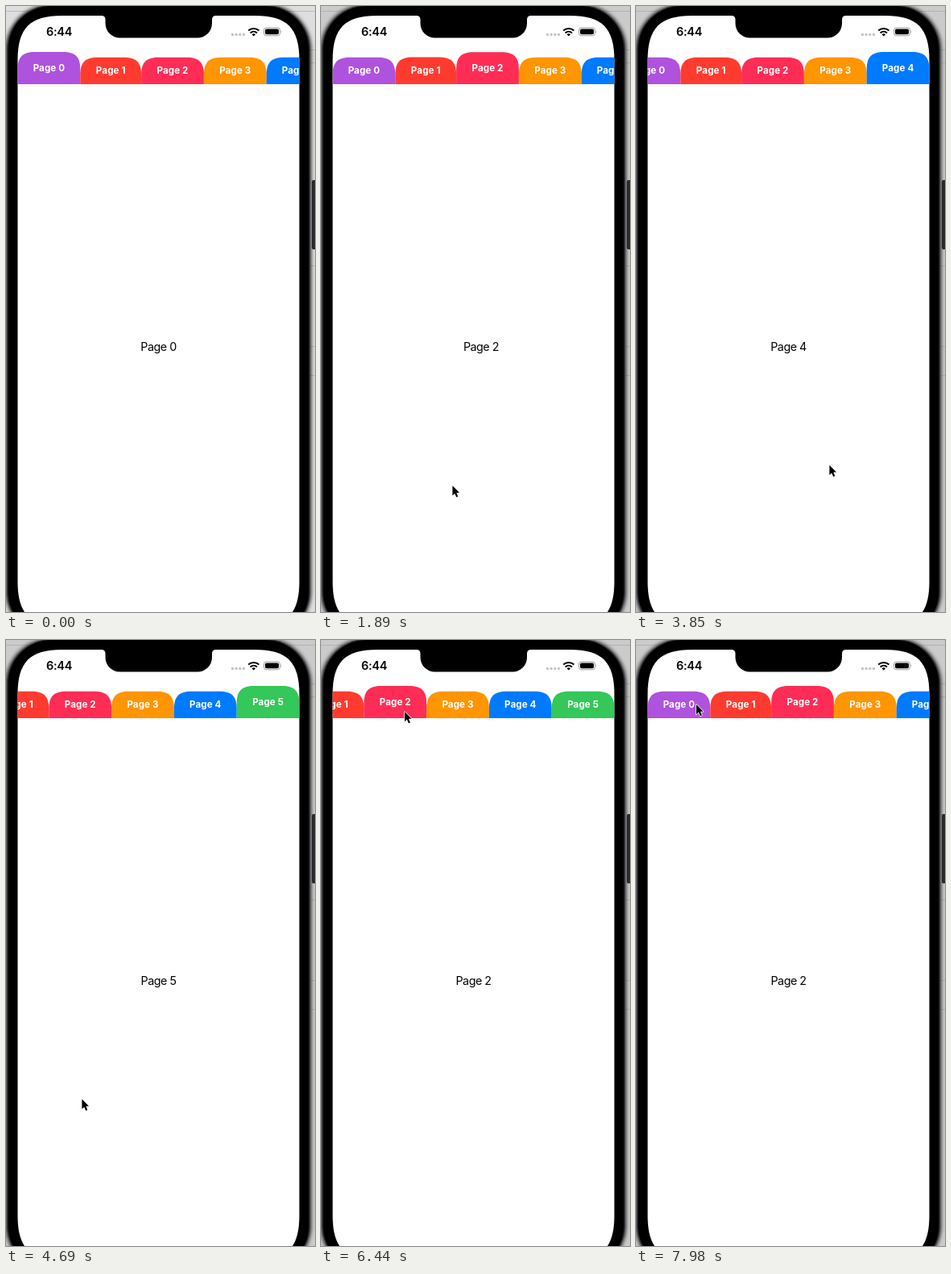
Recreate the animation shown at these times as an HTML page. Size 384x752 px, loop 8000 ms.

```html
<!DOCTYPE html>
<html lang="en">
<head>
<meta charset="utf-8">
<title>Paged tabs</title>
<style>
html, body { margin: 0; width: 100%; height: 100%; overflow: hidden; background: #000; }
svg { display: block; width: 100%; height: 100%; }
text { font-family: Inter, "Open Sans", sans-serif; text-anchor: middle; }
.tab text { font-size: 11.6px; font-weight: 700; letter-spacing: .1px; fill: #fff; }
.page { font-size: 14.3px; letter-spacing: -.5px; }
.clock { font-size: 14.5px; font-weight: 600; letter-spacing: -.3px; }
</style>
</head>
<body>
<svg viewBox="0 0 384 752" preserveAspectRatio="xMidYMid slice">
  <defs>
    <clipPath id="screen"><path id="outline"/></clipPath>
    <filter id="soft"><feGaussianBlur stdDeviation="2"/></filter>
  </defs>

  <rect id="desk" width="384" height="752"/>
  <path d="M378 54.500h6M378 70.500h6M378 322.500h6M378 422.500h6M378 458.500h6M0 6.500h384" stroke="#999" stroke-opacity=".5"/>
  <rect x="-.5" y="-2" width="380" height="785" rx="56" fill="#333" filter="url(#soft)"/>
  <rect x="380" y="216" width="6" height="86" rx="2" fill="#2b2b2d"/>
  <rect x="1" y="-1" width="377" height="783" rx="55" fill="#37383a"/>
  <rect x="2.5" y="0" width="374" height="781" rx="54"/>

  <g clip-path="url(#screen)">
    <rect x="14" y="11" width="351" height="760" fill="#fff"/>
    <g id="tabs"></g>
    <text class="page" id="pageA" y="428"></text>
    <text class="page" id="pageB" y="428"></text>
    <text class="clock" x="66" y="37">6:44</text>
    <path d="M281.500 35.500h14" stroke="#c4c4c6" stroke-width="3.400" stroke-linecap="round" stroke-dasharray="0 4.650"/>
    <path d="M301.200 30.600a9.600 9.600 0 0 1 13.200 0M303.600 33.400a6.200 6.200 0 0 1 8.400 0" fill="none" stroke="#000" stroke-width="2"/>
    <path d="M307.800 37.600l-2.300-2.400a3.400 3.400 0 0 1 4.600 0z"/>
    <rect x="320.5" y="27" width="20" height="9.8" rx="3" fill="none" stroke="#000" stroke-opacity=".38"/>
    <rect x="322" y="28.5" width="17" height="6.8" rx="1.8"/>
    <path d="M341.800 30.200q1.500 1.700 0 3.400z" fill-opacity=".45"/>
    <path d="M118 11h143v1q-5 0-5 5v4.500a18 18 0 0 1-18 18h-96.500a18 18 0 0 1-18-18v-4.500q0-5-5-5z"/>
  </g>

  <path id="cursor" d="M0 0v12.200l2.800-2.600 2 4.700 2.100-.9-2-4.600h3.700z"
        stroke="#fff" stroke-width="1.4" paint-order="stroke" stroke-linejoin="round"/>
</svg>

<script>
const LOOP = 8000, STEP = 70;
const LEFT = 14.5, WIDTH = 350, RIGHT = LEFT + WIDTH, MID = LEFT + WIDTH / 2;
const NS = "http://www.w3.org/2000/svg";
const $ = id => document.getElementById(id);
const colors = ["#af52de", "#ff3b30", "#ff2d55", "#ff9500", "#007aff", "#34c759"];

// Five swipes at an even pace, then a tap on a tab, then a fling of the strip
const SWIPES = 5, FIRST = 565, PACE = 836, DRAG = 200, REACH = 146, DECAY = 94;
const TO_TABS = 4900, TAP = 6060, PULL = 7000, FLING = 7280, LEAVE = 7400;

const clamp = u => Math.max(0, Math.min(1, u));
const smooth = u => (u = clamp(u), u * u * (3 - 2 * u));
const mix = (a, b, u) => a + (b - a) * u;
const mixPoint = (a, b, u) => a.map((v, i) => mix(v, b[i], u));
const swipeStart = i => FIRST + PACE * i;

function add(parent, name, attrs = {}) {
  const el = document.createElementNS(NS, name);
  for (const key in attrs) el.setAttribute(key, attrs[key]);
  return parent.appendChild(el);
}

// Rectangle whose top (and optionally bottom) corners curve continuously
function roundRect(x, y, w, h, r, bottom) {
  const e = 1.28 * r, k = e * .277, c = e - k;
  const low = bottom
    ? `V${y + h - e}c0 ${c} ${-k} ${e} ${-e} ${e}H${x + e}c${-c} 0 ${-e} ${-k} ${-e} ${-e}`
    : `V${y + h}H${x}`;
  return `M${x} ${y + e}c0 ${-c} ${k} ${-e} ${e} ${-e}H${x + w - e}c${c} 0 ${e} ${k} ${e} ${e}${low}z`;
}

let edge = LEFT;
const tabs = colors.map((fill, i) => {
  const x = edge, w = i === 1 ? 75.8 : 77.8;
  edge += w;
  const g = add($("tabs"), "g", { class: "tab" });
  const shape = add(g, "path", { fill });
  const label = add(g, "text", { x: x + w / 2 });
  label.textContent = "Page " + i;
  return { x, w, shape, label };
});

// Each swipe ends a little further left and higher; before the first one the pointer is off stage
const swipeEnd = i => i < 0 ? [410, 630] : [168 - 4.6 * i * i, 597 - 1.7 * i * i];
const swipeFrom = i => [swipeEnd(i)[0] + REACH, swipeEnd(i)[1]];

function pointer(t) {
  const i = Math.min(SWIPES - 1, Math.floor((t - FIRST) / PACE));
  const local = t - swipeStart(i);
  if (i >= 0 && local < DRAG) return mixPoint(swipeFrom(i), swipeEnd(i), (local / DRAG) ** 1.5);
  if (i < SWIPES - 1) return mixPoint(swipeEnd(i), swipeFrom(i + 1), smooth((local - 520) / 256));
  let p = mixPoint(swipeEnd(i), [104, 89], smooth((t - TO_TABS) / 850));
  p = mixPoint(p, [198, 95], clamp((t - PULL) / (FLING - PULL)) ** 1.5);
  return mixPoint(p, [75, 80], smooth((t - LEAVE) / 440));
}

function pagePosition(t) {
  const i = Math.min(SWIPES - 1, Math.floor((t - FIRST) / PACE));
  if (i < 0) return 0;
  const local = t - swipeStart(i);
  const moved = REACH / WIDTH;
  if (local < DRAG) return i + moved * (local / DRAG) ** 1.5;
  const since = local - DRAG;
  return i + 1 - (since > 400 ? 0 : (1 - moved) * Math.exp(-since / DECAY));
}

// Tab heights and strip offset; a picked tab rises and scrolls fully into view
function stripState(t) {
  const raise = colors.map((_, i) => i ? 0 : 1);
  let shift = 0;
  const pick = (page, start) => {
    const u = smooth((t - start) / 300);
    const { x, w } = tabs[page];
    const target = Math.min(Math.max(shift, x + w - RIGHT), x - LEFT);
    raise.forEach((r, i) => raise[i] = mix(r, i === page ? 1 : 0, u));
    shift = mix(shift, target, u);
  };
  for (let i = 0; i < SWIPES; i++) pick(i + 1, swipeStart(i) + DRAG + 14);
  pick(2, TAP);
  if (t >= PULL) {
    shift -= pointer(Math.min(t, FLING))[0] - pointer(PULL)[0];
    shift *= (1 - clamp((t - FLING) / 660)) ** 3;
  }
  return { raise, shift };
}

function showPage(el, page, x) {
  el.textContent = "Page " + page;
  el.setAttribute("x", x);
}

function drawPages(t) {
  if (t >= TAP) {
    const x = MID + WIDTH * smooth((t - TAP) / 350);
    showPage($("pageA"), 2, x - WIDTH);
    showPage($("pageB"), 5, x);
    return;
  }
  const pos = pagePosition(t), page = Math.floor(pos);
  const x = MID - (pos - page) * WIDTH;
  showPage($("pageA"), page, x);
  showPage($("pageB"), Math.min(page + 1, SWIPES), x + WIDTH);
}

function draw(t) {
  const { raise, shift } = stripState(t);
  $("tabs").setAttribute("transform", `translate(${-shift} 0)`);
  tabs.forEach(({ x, w, shape, label }, i) => {
    const top = 63.7 - 6.7 * raise[i];
    shape.setAttribute("d", roundRect(x, top, w, 97 - top, 17));
    label.setAttribute("y", 84.3 - 3.35 * raise[i]);
  });
  drawPages(t);
  $("cursor").setAttribute("transform", `translate(${pointer(t)})`);
  $("desk").setAttribute("fill", t < FIRST ? "#dedede" : "#cbcbcb");
}

function tick() {
  const t = performance.now() % LOOP;
  draw(Math.floor(t / STEP) * STEP);
  requestAnimationFrame(tick);
}

$("outline").setAttribute("d", roundRect(LEFT, 12, WIDTH, 757.6, 43, true));
tick();
</script>
</body>
</html>
```
